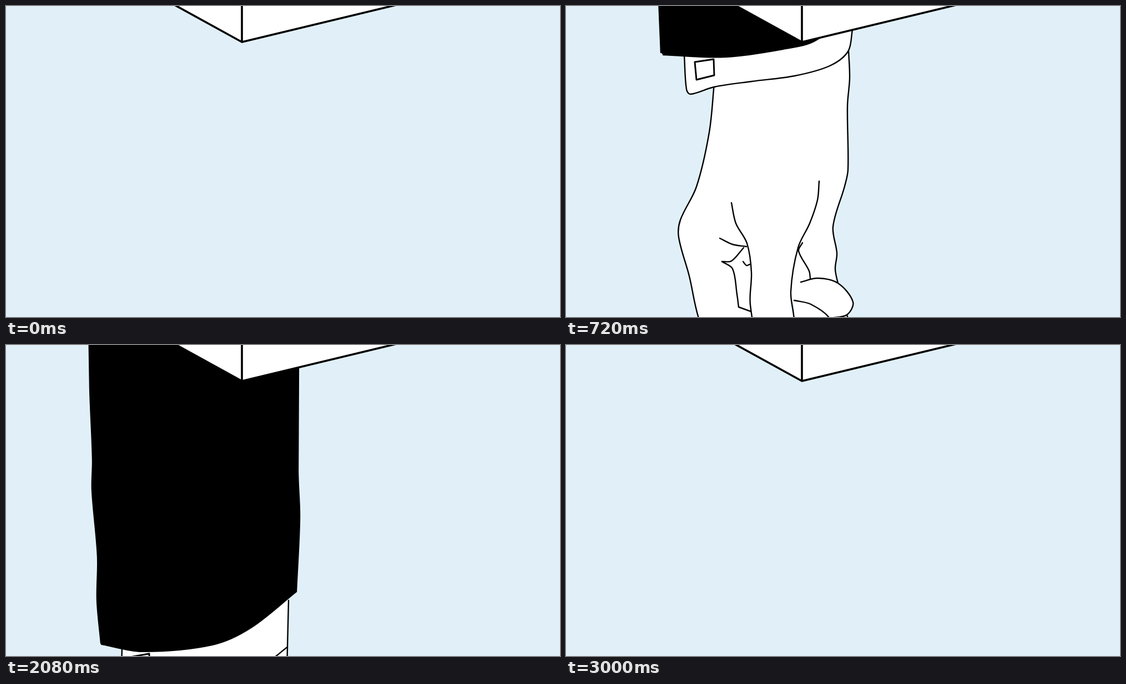
An HTML page with a canvas for the animation above (3080 ms loop, 998 by 561 pixels).

```html
<!DOCTYPE html>
<html>
<head>
<meta charset="utf-8">
<style>
html, body { margin: 0; width: 100%; height: 100%; overflow: hidden; background: #e1f0f8; }
canvas { display: block; }
</style>
</head>
<body>
<canvas id="stage" width="998" height="561"></canvas>
<script>
const ctx = document.getElementById('stage').getContext('2d');
const LOOP = 3080, STEP = 40;
const FINGERS = 414;  // fingers are placed relative to this height

// "x,y x,y ..." to points, shifted down by dy
const pts = (text, dy = 0) => text.split(' ').map(p => {
  const [x, y] = p.split(',').map(Number);
  return [x, y + dy];
});

const dist = (a, b) => Math.hypot(b[0] - a[0], b[1] - a[1]);

// Bezier handle at b, along the direction from a to c
function handle(a, b, c, length) {
  const k = length / 3 / (dist(a, b) + dist(b, c));
  return [b[0] + (c[0] - a[0]) * k, b[1] + (c[1] - a[1]) * k];
}

// Smooth curve through a few key points
function trace(path, p, join) {
  path[join ? 'lineTo' : 'moveTo'](...p[0]);
  for (let i = 1; i < p.length; i++) {
    const b = p[i - 1], c = p[i], a = p[i - 2] || b, d = p[i + 1] || c;
    const len = dist(b, c);
    path.bezierCurveTo(...handle(a, b, c, len), ...handle(d, c, b, len), ...c);
  }
}

// The fill joins all lines; the ink follows each line alone
function shape(fill, lines, dy) {
  const area = new Path2D(), ink = new Path2D();
  lines.map(line => pts(line, dy)).forEach((p, i) => {
    trace(area, p, i > 0);
    trace(ink, p);
  });
  return { fill, area, ink };
}
const skin = (...lines) => shape('#fff', lines);
const finger = (...lines) => shape('#fff', lines, FINGERS);
const sleeve = (...lines) => shape('#000', lines);
const crease = line => shape(null, [line]);

function ring(x, y, rx, ry) {
  const path = new Path2D();
  path.ellipse(x, y + FINGERS, rx, ry, 0, 0, 2 * Math.PI);
  return { fill: '#fff', area: path, ink: path };
}

function cufflink(x, y, tilt) {
  const path = new Path2D(`M${x} ${y}l34-${tilt} 1 29-32 ${tilt + 3}Z`);
  return { fill: '#fff', area: path, ink: path, width: 2.9 };
}

function draw(shapes, dy) {
  ctx.save();
  ctx.translate(0, dy);
  for (const { fill, area, ink, width = 2.4 } of shapes) {
    if (fill) { ctx.fillStyle = fill; ctx.fill(area); }
    ctx.lineWidth = width;
    ctx.stroke(ink);
  }
  ctx.restore();
}

const lowering = [
  finger('506,143 517,182 507,206 488,206 464,173', '475,149'),
  skin('267,140 258,228 235,326 206,386 203,417 222,487 241,569 258,585 304,618',
    '345,610', '411,531', '423,498',
    '491,505 485,475 488,446 481,398 502,325 508,295 507,180 511,130 509,80'),
  finger('423,84 453,77 490,86 517,120 506,143 475,149', '411,117'),
  finger('411,117 441,124 475,150 468,171 434,183', '411,186'),
  ring(375, 227.5, 72.5, 63.5),
  ring(373.5, 225, 51.5, 45),
  skin('298,355 306,392 326,428 334,480 332,539 349,609 383,638 405,616 411,569 405,515 418,436 439,392 453,350 456,316'),
  crease('426,427 419,442 438,478 440,491'),
  crease('277,419 300,430 325,434'),
  crease('320,436 298,460 281,461'),
  crease('281,461 300,474 308,520 311,543'),
  crease('311,543 333,551'),
  crease('319,461 325,468 331,466'),
  skin('213,88 217,150 224,159 267,146 335,136 412,126 475,108 508,82 516,43'),
  cufflink(232, 101, 5),
  sleeve('147,-570 158,-240 165,-60 171,84',
    '175,88 285,92 390,78 450,62 522,0',
    '526,-15 530,-200 539,-570')
];

const rising = [
  finger('502,231 517,275 510,299 492,300 463,268', '466,244'),
  skin('260,240 257,335 240,402 216,458 201,535 187,658 210,718 228,786 252,808 270,795 276,758 256,673',
    '256,673 271,591',
    '281,571', '430,600',
    '493,605 491,530 488,490 504,420 510,340 506,250 507,184'),
  skin('323,507 308,531 281,571 271,591 276,618 338,690 364,694', '370,600'),
  finger('430,183 478,184 509,215 490,240 466,244', '428,217'),
  finger('428,217 457,231 465,259 437,282 429,280'),
  skin('323,507 341,526 358,603 358,638 362,678 378,723 406,739 424,716 429,693 428,603 431,535 446,475 461,430 467,370 464,345'),
  crease('333,558 349,583 350,605'),
  crease('334,613 347,608 361,609'),
  skin('209,184 209,245 219,260 265,241 357,229 416,226 470,211 507,184', '507,184 509,100'),
  cufflink(224, 202, 6),
  sleeve('148,-480 151,-284 156,-154 155,-99 165,21 164,100 171,177',
    '172,179 245,192 372,180 440,150 523,84',
    '523,83 529,-49 526,-134 528,-480')
];

function drawBox() {
  ctx.fillStyle = '#fff';
  ctx.fill(new Path2D('M290-9.4 425 65 735-9.6Z'));
  ctx.lineWidth = 3.6;
  ctx.stroke(new Path2D('M290-9.4 425 65 735-9.6M425-9V65'));
}

function render(now) {
  const t = Math.floor(now % LOOP / STEP) * STEP;
  ctx.fillStyle = '#e1f0f8';
  ctx.fillRect(0, 0, 998, 561);
  ctx.strokeStyle = '#000';
  ctx.lineCap = ctx.lineJoin = 'round';
  if (t < 1360) draw(lowering, (Math.min(t, 1200) - 720) * 1.15);
  else if (t < 3000) draw(rising, 464 - Math.max(0, t - 2000) * 1.29);
  drawBox();
}

const start = performance.now();
function tick() {
  render(performance.now() - start);
  requestAnimationFrame(tick);
}
tick();
</script>
</body>
</html>
```
